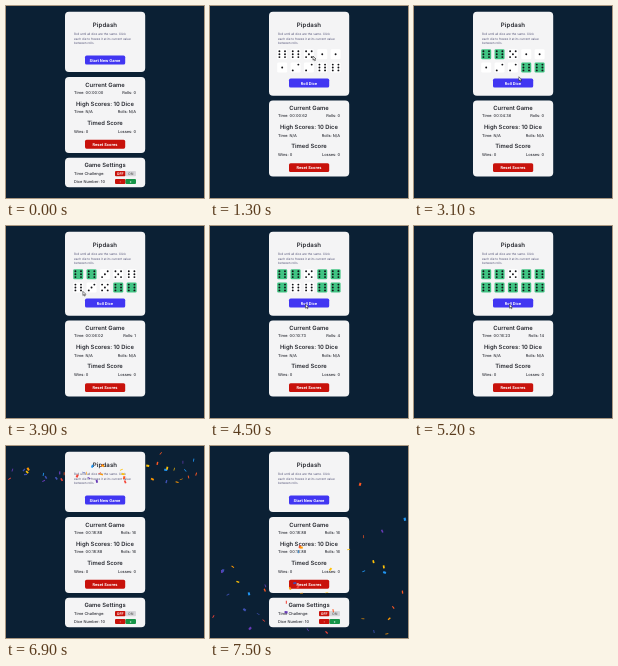
An HTML page that plays this animation: 198 px wide and 192 px high, repeating every 7600 ms.

```html
<!DOCTYPE html>
<html lang="en">
<head>
<meta charset="utf-8">
<title>Dice game</title>
<style>
  html, body { margin: 0; width: 100%; height: 100%; overflow: hidden; background: #0b2034; }
  svg { display: block; width: 100vw; height: 100vh; font-family: Inter, Roboto, sans-serif; text-rendering: geometricPrecision; }
  .card { fill: #f4f4f5; }
  .head { font-size: 5.85px; font-weight: 600; fill: #26282f; text-anchor: middle; }
  .title { font-size: 6.1px; letter-spacing: .1px; }
  .row { font-size: 3.95px; font-weight: 500; fill: #2b2d35; }
  .intro { font-size: 3.08px; fill: #56567a; }
  .end { text-anchor: end; }
  .label { font-size: 3.9px; font-weight: 700; fill: #fff; text-anchor: middle; }
  .switch { font-size: 3.5px; }
  .blue { fill: #4136f2; }
  .red { fill: #c8120b; }
  .green { fill: #159447; }
  .gray { fill: #d6d6da; }
</style>
</head>
<body>
<svg viewBox="0 0 198 192">
  <rect class="card" x="59" y="5.7" width="80.2" rx="4" id="top"/>
  <text class="head title" x="99" y="20.7">Pipdash</text>
  <g class="intro">
    <text x="68" y="29.3">Roll until all dice are the same. Click</text>
    <text x="68" y="33.5">each die to freeze it at its current value</text>
    <text x="68" y="37.7">between rolls.</text>
  </g>
  <g id="dice"></g>
  <g id="main">
    <rect class="blue" x="79" y="49.6" width="40.2" height="8.9" rx="1.6"/>
    <text class="label" x="99" y="55.5" id="action"></text>
  </g>

  <g id="scores">
    <rect class="card" x="59" y="71" width="80.2" height="76" rx="4"/>
    <text class="head" x="99" y="80.6">Current Game</text>
    <text class="row" x="68" y="88" id="time"></text>
    <text class="row end" x="130" y="88" id="rolls"></text>
    <text class="head" x="99" y="99.6">High Scores: 10 Dice</text>
    <text class="row" x="68" y="107.4" id="bestTime"></text>
    <text class="row end" x="130" y="107.4" id="bestRolls"></text>
    <text class="head" x="99" y="119">Timed Score</text>
    <text class="row" x="68" y="126.6">Wins: 0</text>
    <text class="row end" x="130" y="126.6">Losses: 0</text>
    <rect class="red" x="79" y="133.8" width="40.2" height="8.9" rx="1.6"/>
    <text class="label" x="99" y="139.7">Reset Scores</text>
  </g>

  <g id="settings">
    <rect class="card" x="59" y="151.8" width="80.2" height="29.4" rx="4"/>
    <text class="head" x="99" y="161">Game Settings</text>
    <text class="row" x="68" y="169">Time Challenge:</text>
    <text class="row" x="68" y="176.8">Dice Number: 10</text>
    <rect class="red" x="109" y="165" width="10.5" height="5.2" rx="1"/>
    <rect class="gray" x="119.5" y="165" width="10.5" height="5.2" rx="1"/>
    <text class="label switch" x="114.2" y="168.9">OFF</text>
    <text class="label switch" x="124.8" y="168.9" style="fill:#777">ON</text>
    <rect class="red" x="109" y="172.9" width="10.5" height="5.2" rx="1"/>
    <rect class="green" x="119.5" y="172.9" width="10.5" height="5.2" rx="1"/>
    <text class="label switch" x="114.2" y="176.7">-</text>
    <text class="label switch" x="124.8" y="176.7">+</text>
  </g>

  <g id="confetti"></g>
  <path id="cursor" d="M0 0V4.2L1 3.3L1.7 4.8L2.4 4.5L1.7 3H3Z" fill="#fff" stroke="#111" stroke-width=".5"/>
</svg>
<script>
const LOOP = 7600, STEP = 100;
const START = 800, FIRST_ROLL = 3200, FAST_ROLLS = 4300, LAST_PICK = 6400, WIN = 6500;
const $ = id => document.getElementById(id);
const show = (el, on) => el.style.display = on ? '' : 'none';

function add(parent, tag, attrs) {
  const el = document.createElementNS('http://www.w3.org/2000/svg', tag);
  for (const k in attrs) el.setAttribute(k, attrs[k]);
  parent.append(el);
  return el;
}

// Piecewise linear value from { t, ...values } keys
function track(keys, t, name) {
  const i = keys.findIndex(k => k.t > t);
  if (i <= 0) return keys[i < 0 ? keys.length - 1 : 0][name];
  const a = keys[i - 1], b = keys[i];
  return a[name] + (b[name] - a[name]) * (t - a.t) / (b.t - a.t);
}

// Dice are frozen in this order: four before the first roll, the rest later
const order = '1098543672';
const hands = ['6651112266', '6635663566'];

function pickTime(k) {
  if (k < 4) return 2100 + k * 300;
  return k < 9 ? 4000 + (k - 4) * 200 : LAST_PICK;
}

const dice = Array.from({ length: 10 }, (_, i) => {
  const x = 72.2 + i % 5 * 13.35, y = i < 5 ? 48.2 : 61.5;
  const g = add($('dice'), 'g', { transform: `translate(${x} ${y})` });
  const body = add(g, 'rect', { x: -5, y: -5, width: 10, height: 10, rx: 1.3 });
  const pips = [];
  for (let px = -1; px <= 1; px++)
    for (let py = -1; py <= 1; py++) {
      const el = add(g, 'circle', { cx: px * 2.8, cy: py * 2.9, r: .95, fill: '#101014' });
      pips.push({ el, px, py });
    }
  return { i, x, y, body, pips, pickedAt: pickTime(order.indexOf(i)) };
});

function face(die, roll, t) {
  if (roll < 2) return +hands[roll][die.i];
  return t >= die.pickedAt - 300 ? 6 : 1 + (roll * 7 + die.i * 3) % 5;
}

function showsPip(n, { px, py }) {
  if (!px) return !py && n % 2 === 1;
  if (!py) return n === 6;
  return n > 3 || (n > 1 && px === -py);
}

function rollCount(t) {
  if (t < FIRST_ROLL) return 0;
  if (t < FAST_ROLLS) return 1;
  if (t < 5500) return Math.min(14, 2 + Math.floor((t - FAST_ROLLS) / 75));
  return t < 6000 ? 15 : 16;
}

// The pointer starts the game, visits the dice and waits on the button
const button = { x: 95.5, y: 78 };
const picks = [...order].map(i => dice[i]);
const atDie = d => ({ t: d.pickedAt, x: d.x + 2, y: d.y + 2 });
const path = [
  { t: 100, x: 118, y: 62 },
  { t: 700, x: 104, y: 56 },
  { t: 1300, x: 103, y: 50 },
  ...picks.slice(0, 4).map(atDie),
  { t: FIRST_ROLL, ...button },
  ...picks.slice(4, 6).map(atDie),
  { t: FAST_ROLLS, ...button },
  { t: 6000, ...button },
  atDie(picks[9])
];

const clockKeys = [
  { t: START, c: 0 }, { t: 1300, c: 62 }, { t: 3900, c: 602 },
  { t: 5200, c: 1623 }, { t: WIN, c: 1888 }
];
const pad = n => String(n).padStart(2, '0');
function clock(t) {
  const c = Math.round(track(clockKeys, t, 'c'));
  return `Time: 00:${pad(Math.floor(c / 100))}:${pad(c % 100)}`;
}

// Confetti: seeded pieces that speed up as they fall
let seed = 11;
const random = () => (seed = seed * 16807 % 2147483647) / 2147483647;
const colors = ['#f44336', '#ff9800', '#3f51b5', '#2196f3', '#ffc107', '#ff5722', '#673ab7'];
const pieces = Array.from({ length: 44 }, (_, i) => ({
  x: random() * 198,
  fall: 20 + 170 * Math.sqrt(random()),
  drift: (random() - .5) * 24,
  turn: random() * 360,
  el: add($('confetti'), 'rect', {
    x: -1.5, y: -.9, width: 3, height: 1.8 + random() * .6, fill: colors[i % colors.length]
  })
}));

function drawConfetti(t) {
  const e = Math.max(0, t - WIN) / 1000;
  show($('confetti'), e > 0);
  for (const { x, fall, drift, turn, el } of pieces) {
    const flip = .65 + .35 * Math.cos(e * 7 + turn);
    el.setAttribute('transform',
      `translate(${x + drift * e} ${fall * e ** 1.8}) rotate(${turn + e * 260}) scale(1 ${flip})`);
  }
}

function draw(t) {
  const playing = t >= START && t < WIN, won = t >= WIN;
  const rolls = rollCount(t);

  $('top').setAttribute('height', playing ? 84 : 60.4);
  $('main').setAttribute('transform', `translate(0 ${playing ? 23 : 0})`);
  $('scores').setAttribute('transform', `translate(0 ${playing ? 23.4 : 0})`);
  show($('settings'), !playing);
  show($('dice'), playing);
  $('action').textContent = playing ? 'Roll Dice' : 'Start New Game';
  $('time').textContent = clock(t);
  $('rolls').textContent = 'Rolls: ' + rolls;
  $('bestTime').textContent = won ? clock(t) : 'Time: N/A';
  $('bestRolls').textContent = 'Rolls: ' + (won ? rolls : 'N/A');

  for (const die of dice) {
    const n = face(die, rolls, t);
    die.body.setAttribute('fill', t >= die.pickedAt ? '#40c483' : '#fff');
    for (const pip of die.pips) show(pip.el, showsPip(n, pip));
  }

  show($('cursor'), t >= 100 && !won);
  $('cursor').setAttribute('transform', `translate(${track(path, t, 'x')} ${track(path, t, 'y')})`);
  drawConfetti(t);
}

const origin = performance.now();
function tick() {
  const t = (performance.now() - origin) % LOOP;
  draw(Math.floor(t / STEP) * STEP);
  requestAnimationFrame(tick);
}
tick();
</script>
</body>
</html>
```
